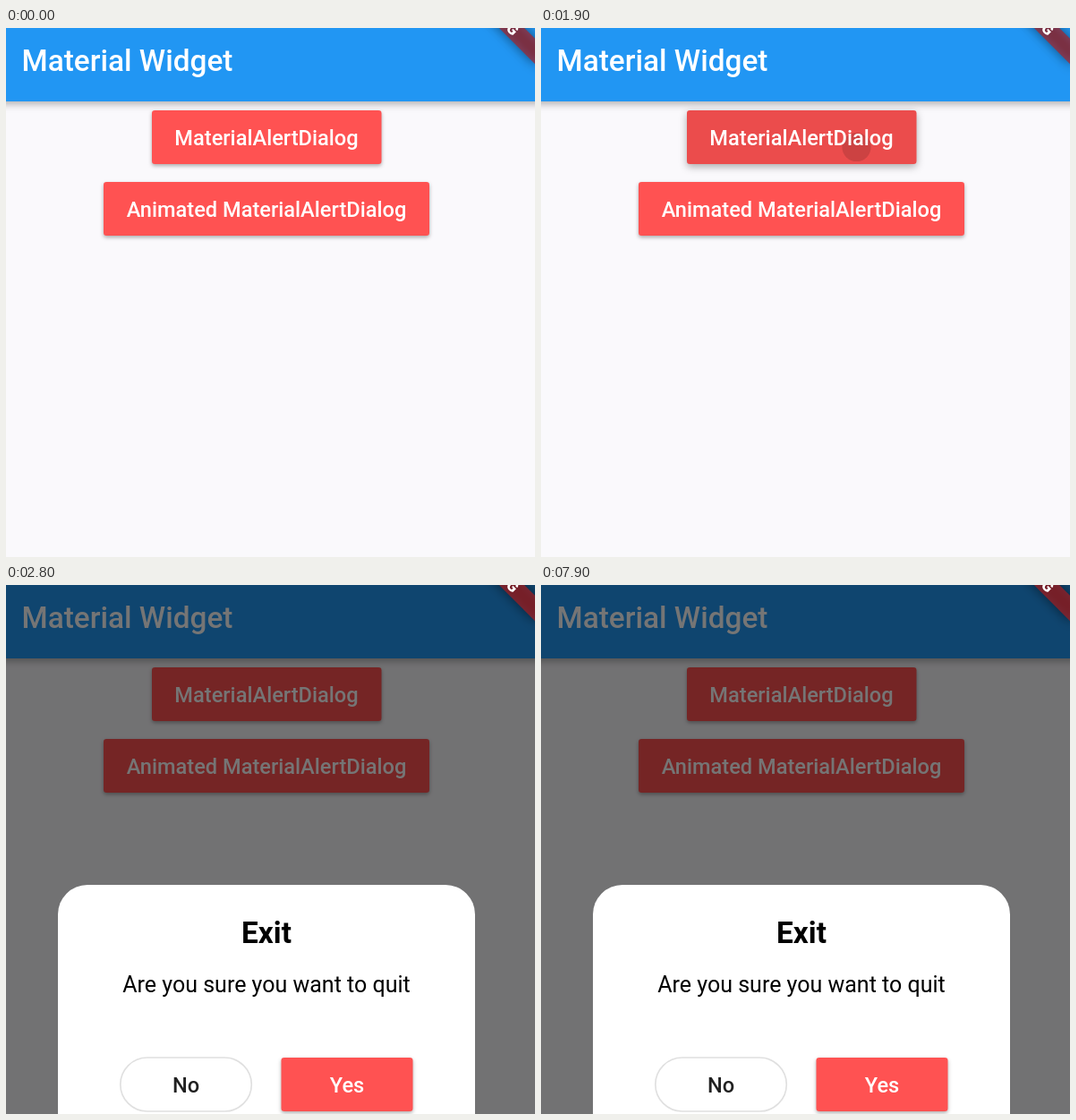
An HTML page for the animation above (8000 ms loop, 591 px wide and 591 px high).

```html
<!DOCTYPE html>
<html>
<head>
<meta charset="utf-8">
<style>
  html, body { margin: 0; width: 100%; height: 100%; overflow: hidden; background: #faf9fc; }
  svg { display: block; width: 591px; height: 591px; }
  text { font: 500 23.6px Roboto, sans-serif; fill: #fff; }
  .mid { text-anchor: middle; }
  .title { font-size: 33.33px; }
  .red { fill: #ff5252; }
  .raised { filter: drop-shadow(0 2px 2px rgba(0, 0, 0, .32)); }
  #bar { fill: #2196f3; filter: drop-shadow(0 3px 4px rgba(0, 0, 0, .3)); }
  #banner text { font-size: 17px; font-weight: 900; }
</style>
</head>
<body>
<svg viewBox="0 0 591 591">
  <clipPath id="buttonShape"><rect x="163" y="92" width="256.5" height="60" rx="3.3"/></clipPath>

  <rect width="591" height="591" fill="#faf9fc"/>
  <rect id="bar" x="-20" y="-20" width="631" height="102"/>
  <text class="title" x="17.5" y="48">Material Widget</text>

  <rect id="button" class="red" x="163" y="92" width="256.5" height="60" rx="3.3"/>
  <g id="ink" clip-path="url(#buttonShape)">
    <rect id="highlight" x="163" y="92" width="257" height="60"/>
    <circle id="splash" cx="352.5" cy="133" fill-opacity=".135"/>
  </g>
  <text class="mid" x="291" y="131">MaterialAlertDialog</text>

  <rect class="red raised" x="109" y="172" width="364" height="60" rx="3.3"/>
  <text class="mid" x="291" y="211">Animated MaterialAlertDialog</text>

  <g id="dialog">
    <rect width="591" height="591" fill-opacity=".54"/>
    <rect x="58" y="335" width="466" height="300" rx="33" fill="#fff"/>
    <text class="title mid" x="291" y="400" style="font-weight:700;fill:#000">Exit</text>
    <text class="mid" x="291" y="455" style="font-size:25px;font-weight:400;fill:#000">Are you sure you want to quit</text>
    <rect x="127.8" y="528" width="146.5" height="60" rx="30" fill="#fff" stroke="#e0e0e0" stroke-width="1.67"/>
    <text class="mid" x="201" y="567" style="fill:#212121">No</text>
    <rect class="red raised" x="307.5" y="528" width="147" height="60" rx="3.3"/>
    <text class="mid" x="381" y="567">Yes</text>
  </g>

  <g id="banner" transform="translate(551 -14) rotate(45)">
    <rect x="-67" y="-10" width="134" height="20" fill-opacity=".5" style="filter:blur(6.6px)"/>
    <rect x="-67" y="-10" width="134" height="20" fill="#b71c1c" fill-opacity=".627"/>
    <text class="mid" y="6">DEBUG</text>
  </g>
</svg>
<script>
  const LOOP = 8000, STEP = 100, PRESS = 1800, OPEN = 2800;
  const [button, ink, highlight, splash, dialog] =
    ["button", "ink", "highlight", "splash", "dialog"].map(id => document.getElementById(id));
  const mix = (a, b, k) => a + (b - a) * k;

  function draw(now) {
    const t = Math.floor(now % LOOP / STEP) * STEP;
    const held = t >= PRESS && t < OPEN ? t - PRESS : 0;
    const press = Math.min(held / 200, 1);
    button.style.filter =
      `drop-shadow(0 ${mix(2, 5, press)}px ${mix(2, 6, press)}px rgba(0, 0, 0, .32))`;
    highlight.setAttribute("fill-opacity", .16 * press);
    splash.setAttribute("r", held * .161);
    ink.style.display = held ? "" : "none";
    dialog.style.display = t >= OPEN ? "" : "none";
    requestAnimationFrame(draw);
  }
  requestAnimationFrame(draw);
</script>
</body>
</html>
```
